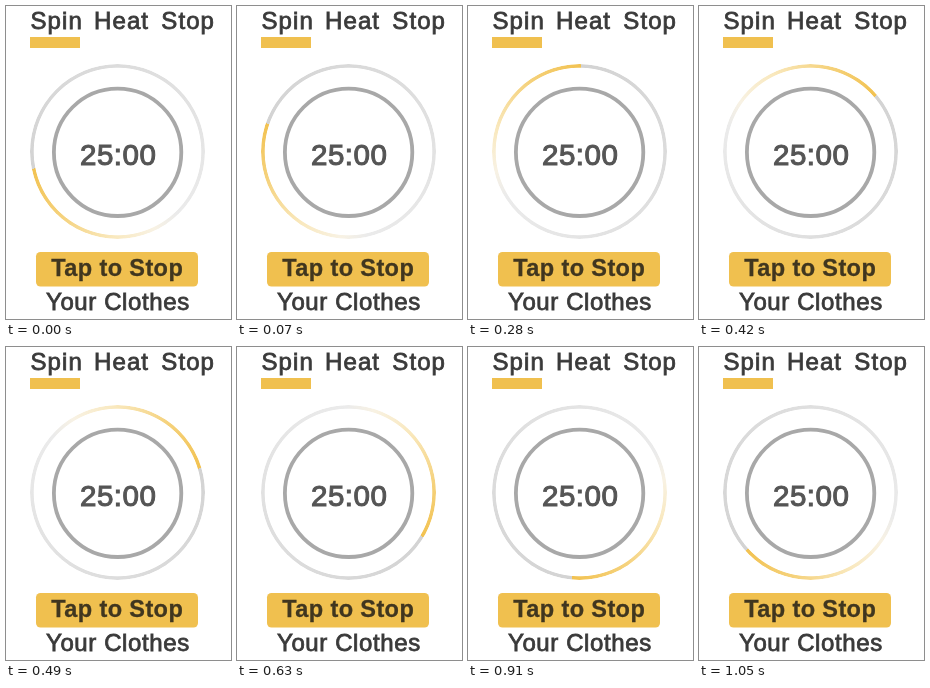
Animation, 225 px wide and 313 px high, one loop 1.12 s. Source, as an HTML page:

```html
<!DOCTYPE html>
<html lang="en">
<head>
<meta charset="utf-8">
<title>Spin timer</title>
<style>
  html, body { margin: 0; width: 100%; height: 100%; overflow: hidden; background: #fff; }
  svg { position: absolute; left: 0; top: 0; }
  text { font: 24px "Liberation Sans", Arial, sans-serif; fill: #3a3a3a; stroke: #3a3a3a; stroke-width: .8px; }
  .tab { letter-spacing: 1.1px; }
  .status { letter-spacing: .6px; }
  .time { font-size: 29.5px; letter-spacing: .5px; fill: #555; stroke: #555; stroke-width: 1.1px; text-anchor: middle; }
  .action { font-size: 23.5px; font-weight: bold; letter-spacing: .4px; fill: #40361f; stroke: #40361f; stroke-width: .3px; text-anchor: middle; }
  #ring {
    position: absolute; left: 24px; top: 58px; width: 175px; height: 175px; border-radius: 50%;
    background: conic-gradient(from var(--head, 258.5deg),
      #d3d3d3, #dedede 120deg, #ebebeb 238deg, #f8f2e4 256deg, #f9e8bd 285deg, #f5d27d 322deg, #f2c251 360deg);
    -webkit-mask: radial-gradient(circle, transparent 83.4px, #000 84.2px);
    mask: radial-gradient(circle, transparent 83.4px, #000 84.2px);
  }
</style>
</head>
<body>
<div id="ring"></div>
<svg width="225" height="313" viewBox="0 0 225 313">
  <text class="tab" x="24.5" y="23">Spin</text>
  <text class="tab" x="88" y="23">Heat</text>
  <text class="tab" x="155.3" y="23">Stop</text>
  <rect x="24" y="31" width="50" height="11" fill="#f0c04f"/>
  <circle cx="111.6" cy="146.3" r="63.7" fill="none" stroke="#a8a8a8" stroke-width="3.8"/>
  <text class="time" x="112.2" y="158.5">25:00</text>
  <rect x="30" y="246" width="162" height="34.5" rx="4.5" fill="#f0c04f"/>
  <text class="action" x="111.2" y="269.5">Tap to Stop</text>
  <text class="status" x="40" y="304">Your Clothes</text>
</svg>
<script>
  const STEP = 70, STEPS = 16;
  // [step, head angle in degrees]: the spinner eases off near the bottom
  const keys = [[0, 258.5], [1, 289], [4, 361], [7, 433.5], [10, 504.5], [13, 545], [15, 588], [16, 618.5]];
  const ring = document.getElementById('ring');
  const start = performance.now();

  function headAngle(step) {
    const i = keys.findIndex(key => key[0] > step);
    const [s0, a0] = keys[i - 1], [s1, a1] = keys[i];
    return a0 + (a1 - a0) * (step - s0) / (s1 - s0);
  }

  function draw() {
    const elapsed = Math.max(0, performance.now() - start);
    const step = Math.floor(elapsed / STEP) % STEPS;
    ring.style.setProperty('--head', headAngle(step) + 'deg');
    requestAnimationFrame(draw);
  }
  draw();
</script>
</body>
</html>
```
